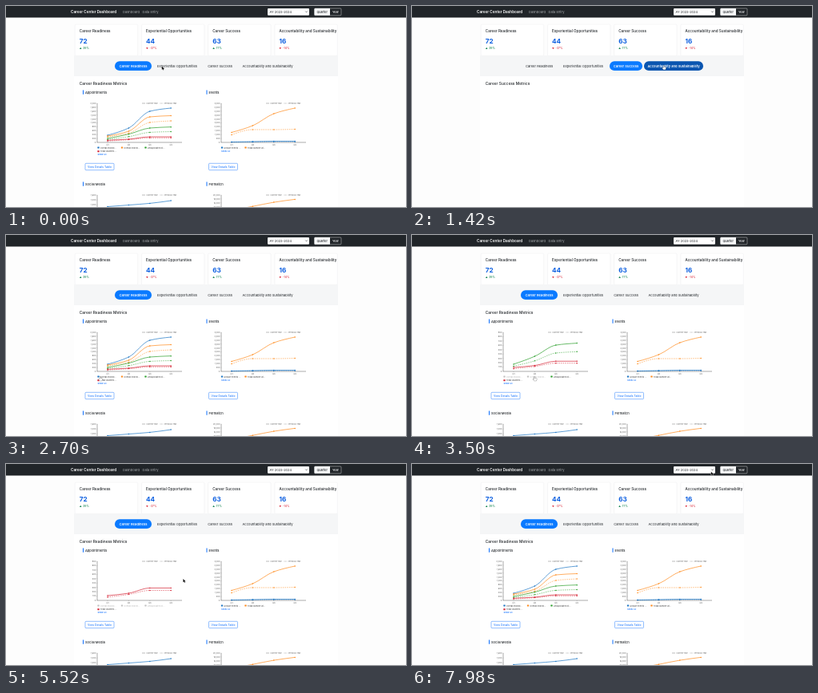
An HTML page with a canvas that plays this animation: 500x252 px, repeating every 8000 ms.

```html
<!DOCTYPE html>
<html lang="en">
<head>
<meta charset="utf-8">
<title>Career Center Dashboard</title>
<style>
  html, body { margin: 0; width: 100%; height: 100%; overflow: hidden; background: #fdfdfd; }
  canvas { display: block; width: 500px; height: 252px; }
</style>
</head>
<body>
<canvas id="stage"></canvas>
<script>
const LOOP = 8000;
const canvas = document.getElementById('stage');
const ctx = canvas.getContext('2d');
const dpr = Math.max(1, window.devicePixelRatio || 1);
canvas.width = 500 * dpr;
canvas.height = 252 * dpr;

const INK = '#212529', BLUE = '#0d6efd', ACTIVE = '#0a7aff', PRESSED = '#0a55b0';
const C = { blue: '#1f77c4', orange: '#ff8c1f', green: '#2ca02c', red: '#d62738' };

// Timeline: [time, tab], [time, series] and [time, x, y]
const CLICKS = [[-1000, 0], [260, 1], [925, 2], [1380, 3], [1810, 1], [2040, 0]];
const TOGGLES = [[2960, 0], [3340, 1], [3780, 2], [6420, 2], [6860, 1], [7160, 0]];
const PATH = [
  [-100, 168, 78], [0, 196, 78], [180, 210, 77], [600, 212, 77], [900, 254, 77], [1000, 256, 77],
  [1320, 315, 77], [1440, 315, 77], [1760, 205, 77], [1810, 198, 77], [1900, 162, 78], [2460, 160, 77],
  [2700, 118, 180], [3000, 118, 180], [3280, 148, 180], [3420, 148, 180], [3700, 175, 180], [4640, 175, 180],
  [5000, 205, 156], [5440, 208, 147], [5850, 352, 140], [6260, 182, 172], [6340, 175, 180], [6480, 175, 180],
  [6780, 155, 180], [6900, 149, 180], [7100, 118, 180], [7240, 118, 180], [7900, 358, 26], [7980, 375, 12], [8000, 375, 12]
];
const TABS = [
  ['Career Readiness', 136, 182], ['Experiential Opportunities', 183, 245],
  ['Career Success', 247, 288], ['Accountability and Sustainability', 290, 364]
];
const CARDS = [['72', '39%', 1], ['44', '-37%', 0], ['63', '77%', 1], ['16', '-14%', 0]];

const clamp = v => Math.max(0, Math.min(1, v));
const smooth = v => { v = clamp(v); return v * v * (3 - 2 * v); };

function text(s, x, y, size, color = INK, weight = 400, align = 'left') {
  ctx.save();
  ctx.translate(x, y);
  ctx.scale(.1, .1);
  ctx.font = `${weight} ${size * 10}px Inter, sans-serif`;
  ctx.textAlign = align;
  ctx.fillStyle = color;
  ctx.fillText(s, 0, 0);
  ctx.restore();
}

function box(x, y, w, h, r, fill, stroke, line = .4) {
  ctx.beginPath();
  ctx.roundRect(x, y, w, h, r);
  if (fill) { ctx.fillStyle = fill; ctx.fill(); }
  if (stroke) { ctx.strokeStyle = stroke; ctx.lineWidth = line; ctx.stroke(); }
}

function line(points, color, width, dash = []) {
  ctx.beginPath();
  points.forEach(([x, y], i) => i ? ctx.lineTo(x, y) : ctx.moveTo(x, y));
  ctx.setLineDash(dash);
  ctx.strokeStyle = color;
  ctx.lineWidth = width;
  ctx.stroke();
  ctx.setLineDash([]);
}

// Monotone cubic through evenly spaced points
function curve(xs, ys, color, dashed) {
  const h = xs[1] - xs[0], n = xs.length;
  const s = ys.slice(1).map((y, i) => (y - ys[i]) / h);
  const m = ys.map((_, i) => {
    const a = s[i - 1], b = s[i];
    return i > 0 && i < n - 1 && a * b > 0 ? 2 * a * b / (a + b) : 0;
  });
  m[0] = (3 * s[0] - m[1]) / 2;
  m[n - 1] = (3 * s[n - 2] - m[n - 2]) / 2;
  ctx.beginPath();
  ctx.moveTo(xs[0], ys[0]);
  for (let i = 1; i < n; i++)
    ctx.bezierCurveTo(xs[i - 1] + h / 3, ys[i - 1] + m[i - 1] * h / 3,
      xs[i] - h / 3, ys[i] - m[i] * h / 3, xs[i], ys[i]);
  ctx.setLineDash(dashed ? [1.5, 1.2] : []);
  ctx.strokeStyle = color;
  ctx.lineWidth = dashed ? .55 : .7;
  ctx.stroke();
  ctx.setLineDash([]);
  ctx.fillStyle = color;
  xs.forEach((x, i) => { ctx.beginPath(); ctx.arc(x, ys[i], .75, 0, 7); ctx.fill(); });
}

function chart({ axis, end, q, gap, top = 122, base = 171, key, max, step, scale = max, series }) {
  line([[axis, top], [axis, base], [end, base]], '#555', .5);
  for (let v = 0; v <= max; v += step) {
    const y = base - v / max * (base - top);
    line([[axis - 1.2, y], [axis, y]], '#777', .35);
    text(v.toLocaleString('en-US'), axis - 1.8, y + .9, 2.4, '#555', 400, 'right');
  }
  const xs = [0, 1, 2, 3].map(i => q + i * gap);
  xs.forEach((x, i) => {
    line([[x, base], [x, base + 1]], '#777', .35);
    text('Q' + (i + 1), x, base + 4, 2.5, '#555', 400, 'center');
  });
  line([[key, top], [key + 4, top]], '#777', .5);
  text('Current Year', key + 5.5, top + .9, 2.35, '#666');
  line([[key + 22.5, top], [key + 26.5, top]], '#777', .5, [1, .7]);
  text('Previous Year', key + 28, top + .9, 2.35, '#666');

  const toY = v => base - v / scale * (base - top);
  for (const [color, now, before] of series) {
    if (before) curve(xs, before.map(toY), color, true);
    if (now) curve(xs, now.map(toY), color, false);
  }
}

function legend(items, showX, showY) {
  for (const [name, x, y, color, off] of items) {
    const c = off ? '#c2c2c2' : color;
    line([[x - .3, y - .9], [x + 2.3, y - .9]], c, .5);
    box(x, y - 1.9, 2, 2, .2, c);
    text(name, x + 3.2, y, 2.65, off ? '#bbb' : '#444');
  }
  text('Show All', showX, showY, 2.65, BLUE, 500);
}

function heading(name, x, y) {
  box(x, y - 4.4, 1, 5.2, 0, BLUE);
  text(name, x + 3, y, 4.05, INK, 500);
}

function detailsButton(x) {
  box(x, 197.3, 36, 8.4, 1, '#fff', BLUE, .45);
  text('View Details Table', x + 18, 202.8, 3.45, BLUE, 400, 'center');
}

const APPOINTMENTS = [
  [C.blue, [367, 735, 1592, 1755]],
  [C.orange, [327, 571, 1306, 1367], [286, 470, 1020, 1100]],
  [C.green, [202, 422, 735, 790], [147, 294, 514, 551]],
  [C.red, [110, 165, 285, 285], [75, 138, 230, 230]]
];

function appointmentState(t) {
  const hidden = [false, false, false, false];
  const limit = () => !hidden[0] ? 2000 : !hidden[1] ? 1400 : 900;
  let from = 2000, since = -1000;
  for (const [at, i] of TOGGLES) {
    if (t < at) break;
    from = limit();
    hidden[i] = !hidden[i];
    since = at;
  }
  const max = limit();
  return { hidden, max, scale: from + (max - from) * smooth((t - since) / 280) };
}

function readiness(t) {
  const { hidden, max, scale } = appointmentState(t);
  const left = { axis: 114, end: 220, q: 127, gap: 26.4, key: 170 };
  const right = { axis: 269, end: 375, q: 282, gap: 26.4, key: 325 };
  const lower = { top: 237, base: 286 };

  heading('Appointments', 96, 110);
  chart({ ...left, max, scale, step: max > 1000 ? 200 : 100, series: APPOINTMENTS.filter((_, i) => !hidden[i]) });
  legend([
    ['Overall individ…', 114.5, 178.5, C.blue, hidden[0]],
    ['Overall individ…', 144, 178.5, C.orange, hidden[1]],
    ['Unduplicated st…', 173.5, 178.5, C.green, hidden[2]],
    ['Total students …', 114.5, 183.2, C.red, hidden[3]]
  ], 114.5, 187.2);
  detailsButton(99);

  heading('Events', 250.5, 110);
  chart({ ...right, max: 5000, step: 500, series: [
    [C.orange, [1276, 2143, 3673, 4388], [969, 1633, 1633, 1684]],
    [C.blue, [50, 100, 150, 150], [40, 70, 100, 110]]
  ] });
  legend([['Unique events …', 269, 178.5, C.blue], ['Total Number at…', 298.5, 178.5, C.orange]], 269, 183);
  detailsButton(253.5);

  heading('Social Media', 96, 225);
  chart({ ...left, ...lower, max: 1600, step: 200, series: [[C.blue, [1126, 1190, 1260, 1370]]] });
  heading('Fernlatch', 250.5, 225);
  chart({ ...right, ...lower, max: 20000, step: 2000, series: [[C.orange, [12200, 14200, 16300, 17800]]] });
}

function experiential() {
  const frame = { top: 124, base: 172, gap: 19.6 };
  heading('Job Postings', 96, 110);
  chart({ ...frame, axis: 126, end: 208, q: 137.5, key: 154, max: 100000, step: 10000, series: [
    [C.blue, [2000, 3000, 4500, 5500], [1500, 2500, 3500, 4500]],
    [C.orange, [4000, 5500, 8500, 10500], [4500, 8500, 14500, 18500]],
    [C.green, [21000, 42000, 56000, 62500], [31000, 52000, 79000, 94000]]
  ] });
  legend([
    ['Local internshi…', 128.5, 179.5, C.blue], ['Local non-inte…', 159, 179.5, C.orange],
    ['Job postings, P…', 128.5, 184.6, C.green]
  ], 128.5, 188.6);
  detailsButton(99);

  heading('Community Based Work Study', 250.5, 110);
  chart({ ...frame, axis: 281, end: 363, q: 292.5, key: 309, max: 16, step: 2, series: [
    [C.orange, null, [10, 10, 10, 10]],
    [C.orange, null, [2, 2, 2, 2]],
    [C.blue, [4, 4, 11, 15]]
  ] });
  legend([['Community Based…', 283, 179.5, C.blue], ['Community Based…', 313.5, 179.5, C.orange]], 283, 184);
  detailsButton(253.5);
}

function header() {
  box(0, 0, 500, 14.5, 0, INK);
  text('Career Center Dashboard', 81, 9, 4.65, '#fff', 600);
  text('Dashboard', 146, 9, 4.05, '#a5a8ab');
  text('Data Entry', 170.5, 9, 4.05, '#a5a8ab');
  box(327, 3, 52, 8.8, 1, '#fff');
  text('AY 2023-2024', 329.5, 8.9, 3.95);
  line([[374.3, 6.6], [375.5, 7.9], [376.7, 6.6]], INK, .6);
  box(385.5, 3, 33.5, 8.8, 1, INK, '#f8f9fa');
  box(385.5, 3, 19.5, 8.8, [1, 0, 0, 1], '#f8f9fa');
  text('Quarter', 395.2, 8.8, 3.7, INK, 500, 'center');
  text('Year', 412, 8.8, 3.7, '#f8f9fa', 500, 'center');
}

function cards() {
  box(85, 62, 330, 26, 0, '#f5f6f7');
  CARDS.forEach(([value, change, up], i) => {
    const x = 86.2 + i * 83.2, ink = up ? '#198754' : '#dc3545', d = up ? 1 : -1;
    box(x, 23, 78.5, 39.5, 1.5, '#fff', '#ececee', .5);
    text(TABS[i][0], x + 5.6, 33, 4.6, INK, 500);
    text(value, x + 5.6, 47.2, 8.2, '#0d5fe0', 700);
    ctx.beginPath();
    ctx.moveTo(x + 7, 53 - 1.2 * d);
    ctx.lineTo(x + 8.3, 53 + 1.1 * d);
    ctx.lineTo(x + 5.7, 53 + 1.1 * d);
    ctx.fillStyle = ink;
    ctx.fill();
    text(change, x + 10, 54.3, 3.4, ink, 500);
  });
}

function tabs(t, last) {
  const [at, current] = CLICKS[last];
  const previous = last ? CLICKS[last - 1][1] : -1;
  const age = t - at, [hx, hy] = pointer(t - 60);
  TABS.forEach(([name, x0, x1], i) => {
    const old = i === previous && i !== current;
    const filled = i === current || (old && age < 50);
    const hover = hx > x0 && hx < x1 && hy > 69 && hy < 81;
    const fill = i === current && age < 200 ? PRESSED : filled ? ACTIVE
      : hover ? '#b9cbdf' : old && age < 250 ? '#e2ebf4' : null;
    if (fill) box(x0, 69.3, x1 - x0, 11.8, 5.9, fill);
    text(name, (x0 + x1) / 2, 76.8, 4.1, filled ? '#fff' : INK, filled ? 600 : 400, 'center');
  });
}

function content(t) {
  const last = CLICKS.findLastIndex(([at]) => t >= at + 50);
  const [at, tab] = CLICKS[last];
  box(85, 88, 330, 164, 0, '#fff');
  ctx.globalAlpha = clamp((t - at - 50) / 130);
  text(TABS[tab][0] + ' Metrics', 91.8, 98.8, 4.85, INK, 500);
  if (tab === 0) readiness(t);
  if (tab === 1) experiential();
  ctx.globalAlpha = 1;
}

function pointer(t) {
  const i = Math.max(1, PATH.findIndex(([at]) => at >= t));
  const [t0, x0, y0] = PATH[i - 1], [t1, x1, y1] = PATH[i];
  const k = smooth((t - t0) / (t1 - t0));
  return [x0 + (x1 - x0) * k, y0 + (y1 - y0) * k];
}

function cursor(t) {
  const [x, y] = pointer(t);
  const hand = t > 60 && ((y > 69 && y < 81) || (y > 175 && y < 185));
  const shape = hand
    ? 'M-.7-2.2Q-.2-2.8.2-2.2V-.6L2-.2Q2.5 0 2.4.8L1.9 2.7H-.9L-2.2.7Q-2 .1-1.3.5L-.7 1Z'
    : 'M-1.2-2.4V2L-.2 1.1.5 2.6 1.2 2.3.6.9H2Z';
  const p = new Path2D(shape);
  ctx.save();
  ctx.translate(x, y);
  ctx.fillStyle = hand ? '#fff' : '#111';
  ctx.strokeStyle = hand ? '#222' : '#fff';
  ctx.lineWidth = .55;
  ctx.stroke(p);
  ctx.fill(p);
  ctx.restore();
}

function draw() {
  const t = performance.now() % LOOP;
  ctx.setTransform(dpr, 0, 0, dpr, 0, 0);
  box(0, 0, 500, 252, 0, '#fdfdfd');
  header();
  cards();
  tabs(t, CLICKS.findLastIndex(([at]) => t >= at));
  content(t);
  cursor(t);
  requestAnimationFrame(draw);
}
draw();
</script>
</body>
</html>
```
